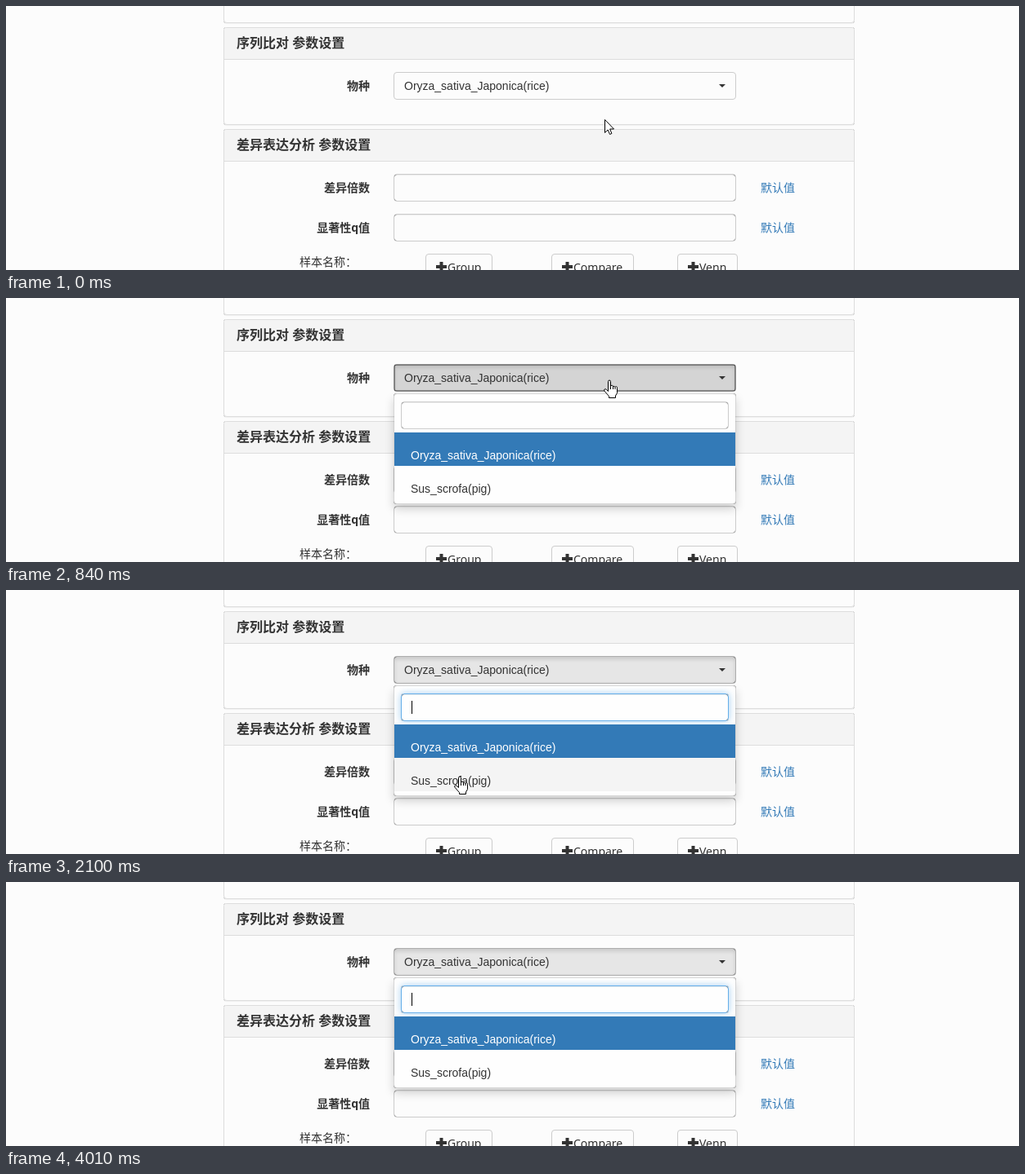
An HTML page with a canvas for the animation above (4110 ms loop, 1239 px wide and 324 px high).

```html
<!DOCTYPE html>
<html lang="zh-CN">
<head>
<meta charset="utf-8">
<title>参数设置</title>
<style>
html, body { margin: 0; width: 100%; height: 100%; overflow: hidden; background: #fcfcfc; }
canvas { display: block; }
</style>
</head>
<body>
<canvas id="stage" width="1239" height="324"></canvas>
<script>
const ctx = document.getElementById('stage').getContext('2d');
const LOOP = 4110;
const PAGE = '#fcfcfc', INK = '#333', BLUE = '#337ab7', LINE = '#ccc';
const ARIAL = '"Liberation Sans", Arial, sans-serif';
const CJK = '"Noto Sans", "Noto Sans CJK SC", "Noto Sans CJK", sans-serif';

const arrow = new Path2D('M.5.5V16.5L4.2 13L6.5 18.5L8.9 17.5L6.6 12H11.5Z');
const hand = new Path2D('M5.5 14.5V2.5a1.5 1.5 0 0 1 3 0V8.5a1.5 1.5 0 0 1 3 .5' +
  'a1.4 1.4 0 0 1 2.5 .5a1.3 1.3 0 0 1 2.5 1V16.5L14.5 20V22.5H6.5V20.5L1 14.2' +
  'C-.2 12.2 1.8 11 3.2 12.2ZM8.5 8.5V12M11.5 9V12M14 9.5V12');

// [start time, cursor kind, x, y]
const moves = [
  [0, 'arrow', 732, 139], [210, 'arrow', 733, 123],
  [420, 'hand', 730, 100], [630, 'hand', 731, 100],
  [1260, 'beam', 616, 142],
  [1470, 'hand', 546, 215], [1680, 'hand', 537, 233], [1890, 'hand', 538, 236],
  [2100, 'hand', 548, 228], [2310, 'hand', 680, 168],
  [2520, 'beam', 741, 135],
  [3380, 'arrow', 1093, 221], [3590, 'arrow', 1195, 302], [3800, 'none', 0, 0]
];
const caretFlips = [1050, 1470, 1890, 2520, 2950, 3590, 4010];

function text(str, x, y, { size = 14, weight = 400, color = INK, font = CJK, align = 'left' } = {}) {
  ctx.font = `${weight} ${size}px ${font}`;
  ctx.fillStyle = color;
  ctx.textAlign = align;
  ctx.fillText(str, x, y);
}

function rounded(x, y, w, h, r) {
  const p = new Path2D();
  p.roundRect(x, y, w, h, r);
  return p;
}

function around(shape) {
  const p = new Path2D();
  p.rect(-50, -50, 1400, 500);
  p.addPath(shape);
  return p;
}

function castShadow(clip, caster, dy, blur, color) {
  ctx.save();
  ctx.clip(clip, 'evenodd');
  ctx.shadowOffsetY = dy;
  ctx.shadowBlur = blur;
  ctx.shadowColor = color;
  ctx.fillStyle = '#000';
  ctx.fill(caster, 'evenodd');
  ctx.restore();
}

const outerShadow = (shape, ...opts) => castShadow(around(shape), shape, ...opts);
const innerShadow = (shape, ...opts) => castShadow(shape, around(shape), ...opts);

function box(x, y, w, h, fill, border, r = 4) {
  ctx.fillStyle = fill;
  ctx.fill(rounded(x, y, w, h, r));
  ctx.strokeStyle = border;
  ctx.lineWidth = 1;
  ctx.stroke(rounded(x + .5, y + .5, w - 1, h - 1, r - .5));
}

function panel(y, h, title) {
  outerShadow(rounded(266, y, 772, h, 4), 1, 1, 'rgba(0,0,0,.05)');
  box(266, y, 772, h, PAGE, '#ddd');
  if (!title) return;
  ctx.fillStyle = '#f4f4f4';
  ctx.fill(rounded(267, y + 1, 770, 38, [3, 3, 0, 0]));
  ctx.fillStyle = '#ddd';
  ctx.fillRect(267, y + 39, 770, 1);
  text(title, 282, y + 25, { size: 16, weight: 700 });
}

function input(x, y, w, fill, focused) {
  const shape = rounded(x, y, w, 34, 4);
  if (focused) outerShadow(shape, 0, 8, 'rgba(102,175,233,.6)');
  box(x, y, w, 34, fill, focused ? '#66afe9' : LINE);
  innerShadow(rounded(x + 1, y + 1, w - 2, 32, 3), 1, 1, 'rgba(0,0,0,.075)');
}

function label(str, y) {
  text(str, 445, y, { weight: 700, align: 'right' });
}

function field(name, y) {
  label(name, y + 22);
  input(474, y, 419, PAGE);
  text('默认值', 923, y + 22, { color: BLUE });
}

function addButton(name, x, w) {
  box(x, 304, w, 34, PAGE, LINE);
  ctx.fillStyle = INK;
  ctx.fillRect(x + 13, 318, 13, 4);
  ctx.fillRect(x + 17.5, 314, 4, 12);
  text(name, x + 27, 326);
}

function select(t) {
  const hover = t >= 420, open = t >= 840, pressed = open && t < 1260;
  const fill = pressed ? '#d4d4d4' : hover ? '#e6e6e6' : PAGE;
  const border = pressed ? '#8c8c8c' : hover ? '#adadad' : LINE;
  box(474, 81, 419, 34, fill, border);
  if (open) innerShadow(rounded(475, 82, 417, 32, 3), 3, 5, 'rgba(0,0,0,.125)');
  if (open && t < 1050) {
    ctx.setLineDash([1, 1]);
    ctx.strokeStyle = INK;
    ctx.strokeRect(475.5, 82.5, 416, 31);
    ctx.setLineDash([]);
  }
  text('Oryza_sativa_Japonica(rice)', 487, 103, { font: ARIAL });
  ctx.fillStyle = INK;
  ctx.fill(new Path2D('M872 96H880L876 100Z'));
}

function menu(t) {
  const shape = rounded(474, 117, 419, 136, 4);
  outerShadow(shape, 6, 12, 'rgba(0,0,0,.175)');
  ctx.fillStyle = '#fefefe';
  ctx.fill(rounded(475, 118, 417, 134, 3));
  ctx.strokeStyle = 'rgba(0,0,0,.15)';
  ctx.stroke(rounded(474.5, 117.5, 418, 135, 3.5));

  input(483, 127, 401, '#fefefe', t >= 1050);
  if (caretFlips.filter(f => t >= f).length % 2) {
    ctx.fillStyle = '#000';
    ctx.fillRect(496, 136, 1, 16);
  }

  ctx.fillStyle = BLUE;
  ctx.fillRect(475, 165, 417, 41);
  text('Oryza_sativa_Japonica(rice)', 495, 198, { font: ARIAL, color: '#fff' });
  if (t >= 1470 && t < 2310) {
    ctx.fillStyle = '#f4f4f4';
    ctx.fillRect(475, 206, 417, 41);
  }
  text('Sus_scrofa(pig)', 495, 239, { font: ARIAL });
}

function cursor(t) {
  const [, kind, x, y] = moves.findLast(m => t >= m[0]);
  if (kind === 'none') return;
  ctx.save();
  ctx.translate(x, y);
  if (kind === 'beam') {
    ctx.fillStyle = '#000';
    for (const row of [0, 15]) {
      ctx.fillRect(0, row, 3, 1);
      ctx.fillRect(4, row, 3, 1);
    }
    ctx.fillRect(3, 1, 1, 14);
  } else {
    const shape = kind === 'hand' ? hand : arrow;
    ctx.fillStyle = '#fff';
    ctx.strokeStyle = '#000';
    ctx.lineWidth = 1;
    ctx.lineJoin = 'round';
    ctx.fill(shape);
    ctx.stroke(shape);
  }
  ctx.restore();
}

function draw(t) {
  ctx.fillStyle = PAGE;
  ctx.fillRect(0, 0, 1239, 324);
  panel(-60, 81);
  panel(26, 120, '序列比对 参数设置');
  panel(151, 240, '差异表达分析 参数设置');
  label('物种', 103);
  field('差异倍数', 206);
  field('显著性q值', 255);
  text('样本名称：', 359, 319);
  addButton('Group', 513, 82);
  addButton('Compare', 667, 101);
  addButton('Venn', 821, 74);
  select(t);
  if (t >= 840) menu(t);
  cursor(t);
}

const start = performance.now();
function tick() {
  draw((performance.now() - start) % LOOP);
  requestAnimationFrame(tick);
}
tick();
</script>
</body>
</html>
```
